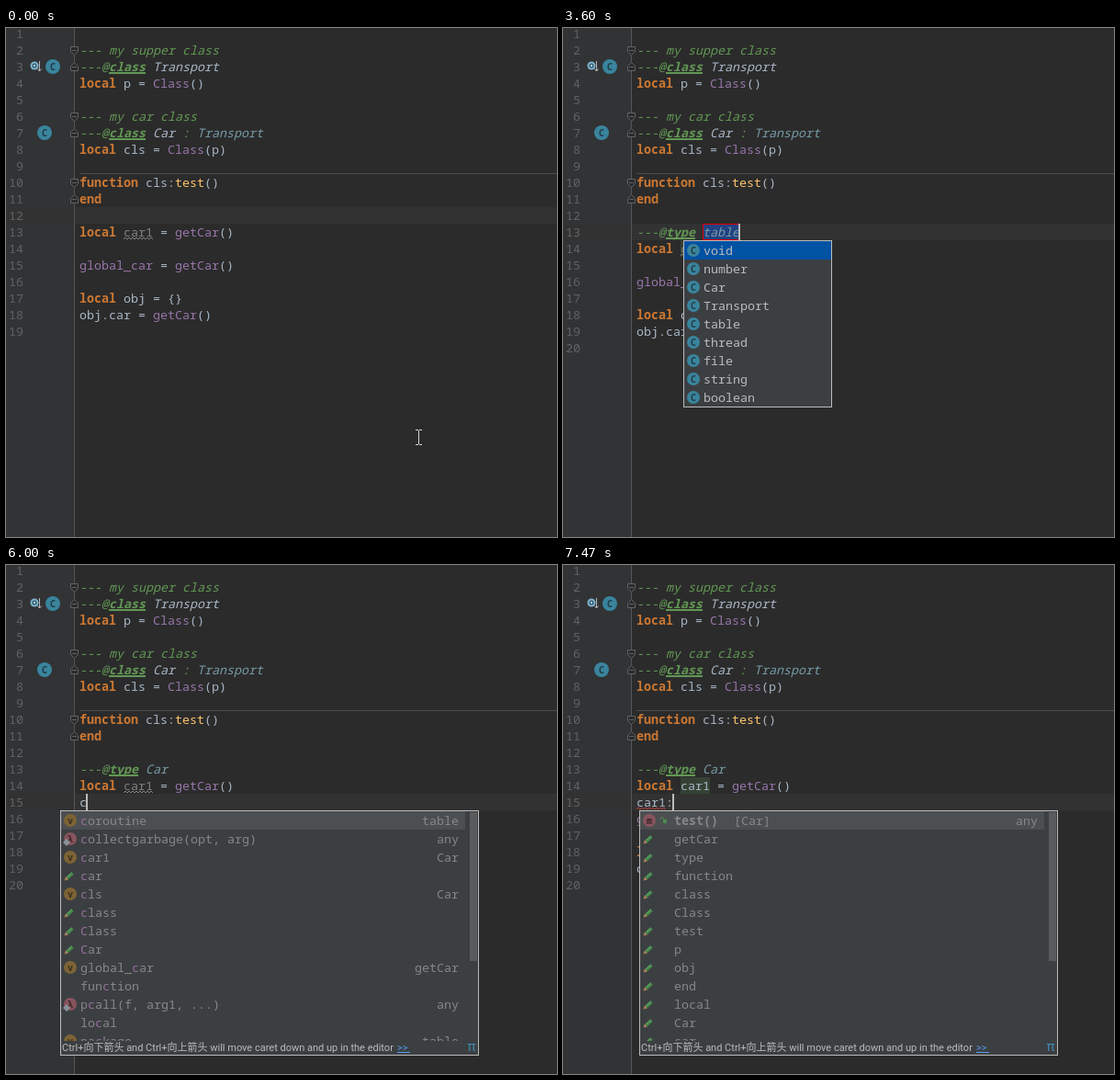
An HTML page with a canvas for the animation above (8 s loop, 600x554 px).

```html
<!DOCTYPE html>
<html lang="en">
<head>
<meta charset="utf-8">
<title>Lua type annotation</title>
<style>
html, body { margin: 0; width: 100%; height: 100%; overflow: hidden; background: #2b2b2b; }
canvas { display: block; }
</style>
</head>
<body>
<canvas id="stage" width="600" height="554"></canvas>
<script>
const ctx = document.getElementById('stage').getContext('2d');
const LOOP = 8000, STEP = 1000 / 15, CH = 8, LEFT = 80;
const MONO = '13.333px "Noto Sans Mono", monospace';
const UI = '"Roboto", "Noto Sans CJK SC", "Noto Sans CJK", sans-serif';

// style key: [colour, font prefix, underlined]
const STYLES = {
  n: ['#a9b7c6', ''],
  k: ['#cc7832', 'bold '],
  p: ['#9876aa', ''],
  f: ['#ffc66d', ''],
  u: ['#7d7f82', ''],
  d: ['#629755', 'italic '],
  t: ['#629755', 'italic bold ', true],
  c: ['#a9b7c6', 'italic '],
  r: ['#769aa5', 'italic ']
};

const HEAD = [
  '',
  'd~--- my supper class',
  'd~---@|t~class|c~ Transport',
  'k~local|n~ p = |p~Class|n~()',
  '',
  'd~--- my car class',
  'd~---@|t~class|c~ Car|d~ : |r~Transport',
  'k~local|n~ cls = |p~Class|n~(p)',
  '',
  'k~function|n~ cls:|f~test|n~()',
  'k~end',
  ''
];
const TAIL = [
  'p~global_car|n~ = |p~getCar|n~()',
  '',
  'k~local|n~ obj = {}',
  'n~obj.car = |p~getCar|n~()',
  ''
];

// [icon, label, type]
const LIST_C = [
  ['v', 'coroutine', 'table'], ['l', 'collectgarbage(opt, arg)', 'any'],
  ['v', 'car1', 'Car'], ['e', 'car'], ['v', 'cls', 'Car'], ['e', 'class'],
  ['e', 'Class'], ['e', 'Car'], ['v', 'global_car', 'getCar'], ['', 'function'],
  ['l', 'pcall(f, arg1, ...)', 'any'], ['', 'local'], ['v', 'package', 'table']
];
const LIST_CA = [
  ['v', 'car1', 'Car'], ['e', 'car'], ['e', 'Car'], ['v', 'global_car', 'getCar'],
  ['l', 'pcall(f, arg1, ...)', 'any'], ['', 'local'], ['l', 'xpcall(f, err)', 'any'],
  ['e', 'getCar']
];
const LIST_MEMBER = [['m', 'test()', 'any']].concat(
  'getCar type function class Class test p obj end local Car car'.split(' ').map(w => ['e', w]));
const TYPES = 'void number Car Transport table thread file string boolean'.split(' ');

// Last entry of [time, value] pairs that has begun
const at = (t, track) => track.reduce((v, [time, next]) => t >= time ? next : v, null);
const rowTop = n => 18 * n - 21;

function rect(x, y, w, h, color) {
  ctx.fillStyle = color;
  ctx.fillRect(x, y, w, h);
}

function frame(x, y, w, h, color) {
  ctx.strokeStyle = color;
  ctx.lineWidth = 1;
  ctx.strokeRect(x + 0.5, y + 0.5, w - 1, h - 1);
}

function text(s, x, y, color, font = MONO, align = 'left') {
  ctx.font = font;
  ctx.fillStyle = color;
  ctx.textAlign = align;
  ctx.fillText(s, x, y);
}

function path(points, close) {
  ctx.beginPath();
  points.forEach(([x, y], i) => i ? ctx.lineTo(x, y) : ctx.moveTo(x, y));
  if (close) ctx.closePath();
}

function disc(x, y, r, color) {
  ctx.fillStyle = color;
  ctx.beginPath();
  ctx.arc(x, y, r, 0, Math.PI * 2);
  ctx.fill();
}

function badge(x, y, r, letter, color, ink) {
  disc(x, y, r, color);
  text(letter, x, y + 3.5, ink, 'bold 10px "Noto Sans Mono", monospace', 'center');
}

const classBadge = (x, y, r) => badge(x, y, r, 'C', '#3a849d', '#223a44');

function wave(x, y, w, color) {
  const pts = [];
  for (let i = 0; i <= w; i += 2) pts.push([x + i, y + (i % 4 ? 0 : 2)]);
  path(pts);
  ctx.strokeStyle = color;
  ctx.lineWidth = 1;
  ctx.stroke();
}

function codeLine(markup, n) {
  let x = LEFT;
  const y = rowTop(n) + 14;
  if (!markup) return;
  for (const part of markup.split('|')) {
    const s = part.slice(2), [color, prefix, underlined] = STYLES[part[0]];
    text(s, x, y, color, prefix + MONO);
    if (underlined) rect(x, y + 1, s.length * CH, 2, color);
    x += s.length * CH;
  }
}

function fold(n, down) {
  const y = rowTop(n) + (down ? 9.5 : 9.5), s = down ? 1 : -1;
  path([[70.5, y - 4 * s], [78.5, y - 4 * s], [78.5, y + s], [74.5, y + 5 * s], [70.5, y + s]], true);
  ctx.fillStyle = '#2b2b2b';
  ctx.fill();
  ctx.strokeStyle = '#606366';
  ctx.lineWidth = 1;
  ctx.stroke();
  rect(72, y - 0.5, 5, 1, '#606366');
}

function gutterIcons() {
  disc(31, 41, 4.5, '#7fb2cc');
  disc(31, 41, 2.5, '#31566a');
  disc(31, 41, 1.2, '#a9d0e2');
  ctx.strokeStyle = '#b4b8bb';
  ctx.lineWidth = 1;
  path([[36.5, 36], [36.5, 47]]);
  ctx.stroke();
  path([[34.5, 44.5], [36.5, 47], [38.5, 44.5]]);
  ctx.stroke();
  classBadge(51, 42, 8);
  classBadge(42, 114, 8);
}

function bulb(x, y) {
  disc(x, y - 2, 5, '#efb455');
  rect(x - 3, y + 1, 6, 3, '#efb455');
  rect(x - 2, y + 4, 5, 1, '#c9c9c9');
  rect(x - 2, y + 6, 5, 2, '#a0a0a0');
}

function pencil(x, y) {
  ctx.lineWidth = 3.5;
  ctx.strokeStyle = '#44894b';
  path([[x - 3, y + 2.5], [x + 3, y - 3]]);
  ctx.stroke();
  ctx.lineWidth = 1;
  ctx.strokeStyle = '#6fab75';
  path([[x - 3, y + 1], [x + 2, y - 3.5]]);
  ctx.stroke();
  path([[x - 6, y + 5], [x - 4.5, y + 0.8], [x - 1.6, y + 4]], true);
  ctx.fillStyle = '#a9845c';
  ctx.fill();
}

function listIcon(kind, x, y) {
  if (kind === 'v') badge(x, y, 7, 'v', '#7d6335', '#392f1d');
  if (kind === 'm') badge(x, y, 7, 'm', '#87545d', '#3b2529');
  if (kind === 'e') pencil(x - 0.5, y + 0.5);
  if (kind === 'l') {
    badge(x, y, 7, 'λ', '#87545d', '#3b2529');
    path([[x - 4, y], [x, y + 4], [x - 4, y + 8], [x - 8, y + 4]], true);
    ctx.fillStyle = '#87929a';
    ctx.fill();
  }
}

function label(s, x, y, color, query, font) {
  const i = query ? s.toLowerCase().indexOf(query) : -1;
  if (i < 0) return text(s, x, y, color, font);
  const end = i + query.length;
  text(s.slice(0, i), x, y, color, font);
  text(s.slice(i, end), x + i * CH, y, '#94709e', font);
  text(s.slice(end), x + end * CH, y, color, font);
}

function typePopup(items, query) {
  const h = items.length * 20 + 2;
  rect(131, 231, 162, h, '#3c3f41');
  rect(132, 232, 160, 20, '#0052a3');
  items.forEach((s, i) => {
    const y = 242 + i * 20;
    classBadge(142, y, 7);
    label(s, 153, y + 5, '#bbbbbb', query);
  });
  frame(131, 231, 162, h, '#bbbbbb');
}

function lookup(x, items, bottom, query, indent = 22, scroll = true) {
  const top = 267, w = 456, gray = '#858788';
  rect(x, top, w, bottom - top, '#3c3f41');
  rect(x + 1, top + 1, 440, 20, '#4c4f51');
  ctx.save();
  ctx.beginPath();
  ctx.rect(x, top, w, bottom - top - 16);
  ctx.clip();
  items.forEach(([icon, s, type], i) => {
    const y = 278 + i * 20;
    listIcon(icon, x + 11, y);
    label(s, x + indent, y + 5, gray, query, (icon === 'm' ? 'bold ' : '') + MONO);
    if (type) text(type, x + 434, y + 5, gray, MONO, 'right');
    if (icon === 'm') {
      text('[Car]', x + 103, y + 5, gray);
      disc(x + 28, y + 1, 2.2, '#4f8f4f');
      ctx.strokeStyle = '#4f8f4f';
      ctx.lineWidth = 1;
      ctx.beginPath();
      ctx.arc(x + 25, y - 1, 2, Math.PI, 0);
      ctx.stroke();
    }
  });
  ctx.restore();
  if (scroll) rect(x + 446, top + 2, 8, 162, '#595b5d');
  const y = bottom - 5;
  text('Ctrl+向下箭头 and Ctrl+向上箭头 will move caret down and up in the editor',
    x + 2, y, '#bbbbbb', '11px ' + UI);
  text('>>', x + 367, y, '#589df6', '11px ' + UI);
  rect(x + 367, y + 1, 14, 1, '#589df6');
  text('π', x + 448, y, '#3f8fb8', '14px "Noto Sans", sans-serif', 'center');
  frame(x, top, w, bottom - top, '#bbbbbb');
}

function actionPopup(selected) {
  rect(151, 231, 184, 46, '#3c3f41');
  rect(152, 232 + selected * 22, 182, 22, '#4b6eaf');
  ['Safe remove', 'Create type annotation'].forEach((s, i) => {
    const y = 243 + i * 22;
    bulb(164, y - 1);
    text(s, 177, y + 4, '#bbbbbb', '12px ' + UI);
    path([[324, y - 4], [329, y], [324, y + 4]], true);
    ctx.fillStyle = '#a0a0a0';
    ctx.fill();
  });
  frame(151, 231, 184, 46, '#bbbbbb');
}

function pointer(t) {
  const step = Math.floor((t + 4) / STEP);
  if (step > 18) return;
  let x, y;
  if (step < 16) {
    const u = Math.min(step / 9, 1), e = u * u * (3 - 2 * u);
    x = 449 - 294 * e;
    y = 445 - 217 * e;
  } else {
    const u = (step - 15) / 3;
    x = 155 + 357 * u;
    y = 228 + 111 * u;
  }
  x = Math.round(x);
  y = Math.round(y);
  const c = '#d8d8d8';
  rect(x, y - 7, 1, 15, c);
  for (const dy of [-8, 8]) {
    rect(x - 3, y + dy, 3, 1, c);
    rect(x + 1, y + dy, 3, 1, c);
  }
}

function draw(t) {
  const annotated = t >= 3530;
  const carRow = annotated ? 14 : 13;
  const template = annotated && t < 4800;
  const word = at(t, [[3530, 'table'], [4070, 'c'], [4270, 'ca'], [4800, 'Car']]);
  const typed = at(t, [[0, ''], [5930, 'c'], [6070, 'ca'], [7070, 'car1'], [7400, 'car1:']]);
  const row = at(t, [[0, 12], [800, 13], [5470, 14], [5670, 15]]);
  const used = t >= 7400;
  const carLine = `k~local|n~ |${used ? 'n' : 'u'}~car1|n~ = |p~getCar|n~()`;
  const lines = HEAD.concat(
    annotated ? ['d~---@|t~type|d~ |r~' + word, carLine, 'n~' + typed] : [carLine, ''], TAIL);

  rect(0, 0, 600, 554, '#2b2b2b');
  rect(0, 0, 74, 554, '#313335');
  rect(0, rowTop(row), 600, 18, '#323232');
  rect(74, 0, 1, 554, '#555555');
  rect(80, 158, 520, 1, '#4d4d4d');

  const mark = (x, n, w) => rect(x, rowTop(n), w, 18, '#344134');
  if ((t >= 930 && t < 5070) || used) mark(128, carRow, 32);
  if (t >= 5070 && t < 5730) {
    mark(160, 7, 24);
    mark(152, 13, 24);
  }
  if (template) {
    if (word === 'table') rect(152, 213, 40, 18, '#214283');
    frame(152, 213, word.length * CH + 1, 18, '#e00000');
  }

  lines.forEach((line, i) => {
    text(String(i + 1), 19, rowTop(i + 1) + 14, '#606366', MONO, 'right');
    codeLine(line, i + 1);
  });
  if (!used) wave(128, rowTop(carRow) + 15, 32, '#808284');
  else wave(80, rowTop(15) + 15, 32, '#bc3f3c');

  [2, 6, 10].forEach(n => {
    fold(n, true);
    fold(n + 1, false);
  });
  gutterIcons();
  if (t >= 1930 && t < 2400) bulb(94, 205);

  const caret = at(t, [[0, 0], [800, 152], [1800, 0], [2330, 152], [3530, 192], [4070, 160],
    [4270, 168], [4800, 176], [5670, 80], [5930, 88], [6070, 96], [7000, 0], [7070, 112], [7400, 120]]);
  if (caret) rect(caret - 1, rowTop(row), 2, 18, '#bbbbbb');

  if (t >= 2400 && t < 3530) actionPopup(t < 3000 ? 0 : 1);
  if (t >= 3600 && t < 4800) {
    if (t < 4070) typePopup(TYPES);
    else typePopup(['Car'], word);
  }
  if (t >= 6000 && t < 6070) lookup(59, LIST_C, 534, 'c');
  if (t >= 6070 && t < 7070) lookup(59, LIST_CA, 444, 'ca', 22, false);
  if (t >= 7470) lookup(83, LIST_MEMBER, 534, '', 38);
  pointer(t);
}

const start = performance.now();
function tick() {
  draw((performance.now() - start) % LOOP);
  requestAnimationFrame(tick);
}
tick();
</script>
</body>
</html>
```
